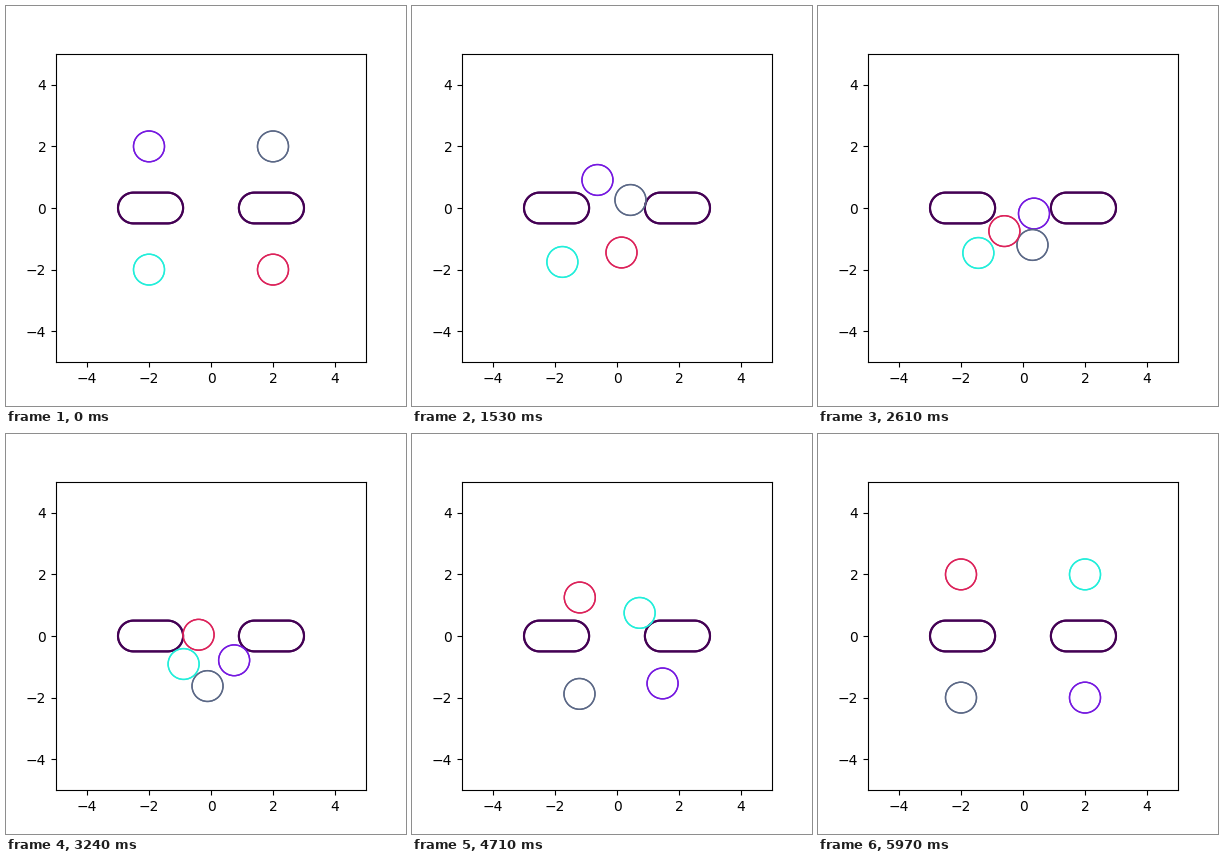
A matplotlib script that plays this animation: 400 by 400 pixels, repeating every 6000 ms.

```python
import matplotlib.pyplot as plt
import numpy as np
from matplotlib.animation import FuncAnimation
from matplotlib.patches import Circle
from matplotlib.patheffects import Normal

FRAMES, STEP_MS = 200, 30
RADIUS = 0.5
WALLS = [(-2.5, -1.4), (1.4, 2.5)]      # core segments of the capsules on y = 0
CRISP = [Normal(), Normal()]            # stroke twice for firmer edges

# Colour, start and a few (step, x, y) points; each agent ends opposite its start
AGENTS = [
    ("#7518e0", (-2, 2), [(51, -.63, .91), (87, .355, -.18),
                          (128, 1.05, -1.25), (157, 1.47, -1.54)]),
    ("#5b6886", (2, 2), [(27, 1.08, 1.17), (51, .435, .26), (87, .306, -1.2),
                         (128, -.6, -1.82), (157, -1.21, -1.88)]),
    ("#22eeda", (-2, -2), [(27, -1.84, -1.82), (87, -1.44, -1.46),
                           (128, -.24, -.26), (157, .73, .75)]),
    ("#dc225a", (2, -2), [(27, 1.03, -1.69), (51, .145, -1.445), (87, -.6, -.75),
                          (128, -.5, .755), (157, -1.2, 1.25)]),
]


def smooth_path(start, points):
    """Cubic Hermite curve through the points, sampled at every step."""
    x, y = start
    keys = np.array([(0, x, y), *points, (FRAMES - 1, -x, -y)], float)
    k, p = keys[:, 0], keys[:, 1:]
    slope = np.gradient(p, k, axis=0, edge_order=2)
    t = np.arange(FRAMES)
    i = np.clip(np.searchsorted(k, t, side="right") - 1, 0, len(k) - 2)
    h = (k[i + 1] - k[i])[:, None]
    s = (t - k[i])[:, None] / h
    return ((1 + 2 * s) * (1 - s) ** 2 * p[i] + s * (1 - s) ** 2 * h * slope[i]
            + s ** 2 * (3 - 2 * s) * p[i + 1] + s ** 2 * (s - 1) * h * slope[i + 1])


def keep_clear(path):
    """Push positions that would overlap a capsule out to its rim."""
    for x0, x1 in WALLS:
        core = np.column_stack([np.clip(path[:, 0], x0, x1), np.zeros(FRAMES)])
        gap = path - core
        dist = np.linalg.norm(gap, axis=1, keepdims=True)
        path = core + gap * np.maximum(1, 2 * RADIUS / dist)
    return path


def draw_capsule(ax, x0, x1):
    a = np.linspace(-np.pi / 2, np.pi / 2, 60)
    x = np.r_[x1 + RADIUS * np.cos(a), x0 - RADIUS * np.cos(a)]
    y = np.r_[RADIUS * np.sin(a), -RADIUS * np.sin(a)]
    ax.fill(x, y, fill=False, ec="#440154", lw=1.5, path_effects=CRISP)


fig, ax = plt.subplots(figsize=(4, 4), dpi=100)
ax.set(xlim=(-5, 5), ylim=(-5, 5),
       xticks=range(-4, 5, 2), yticks=range(-4, 5, 2))
for wall in WALLS:
    draw_capsule(ax, *wall)

paths, discs = [], []
for color, start, points in AGENTS:
    paths.append(keep_clear(smooth_path(start, points)))
    discs.append(ax.add_patch(Circle(start, RADIUS, fill=False, ec=color, lw=1,
                                     path_effects=CRISP)))


def update(step):
    for disc, path in zip(discs, paths):
        disc.center = path[step]
    return discs


anim = FuncAnimation(fig, update, frames=FRAMES, interval=STEP_MS,
                     repeat=True, repeat_delay=0)
plt.show()
```
